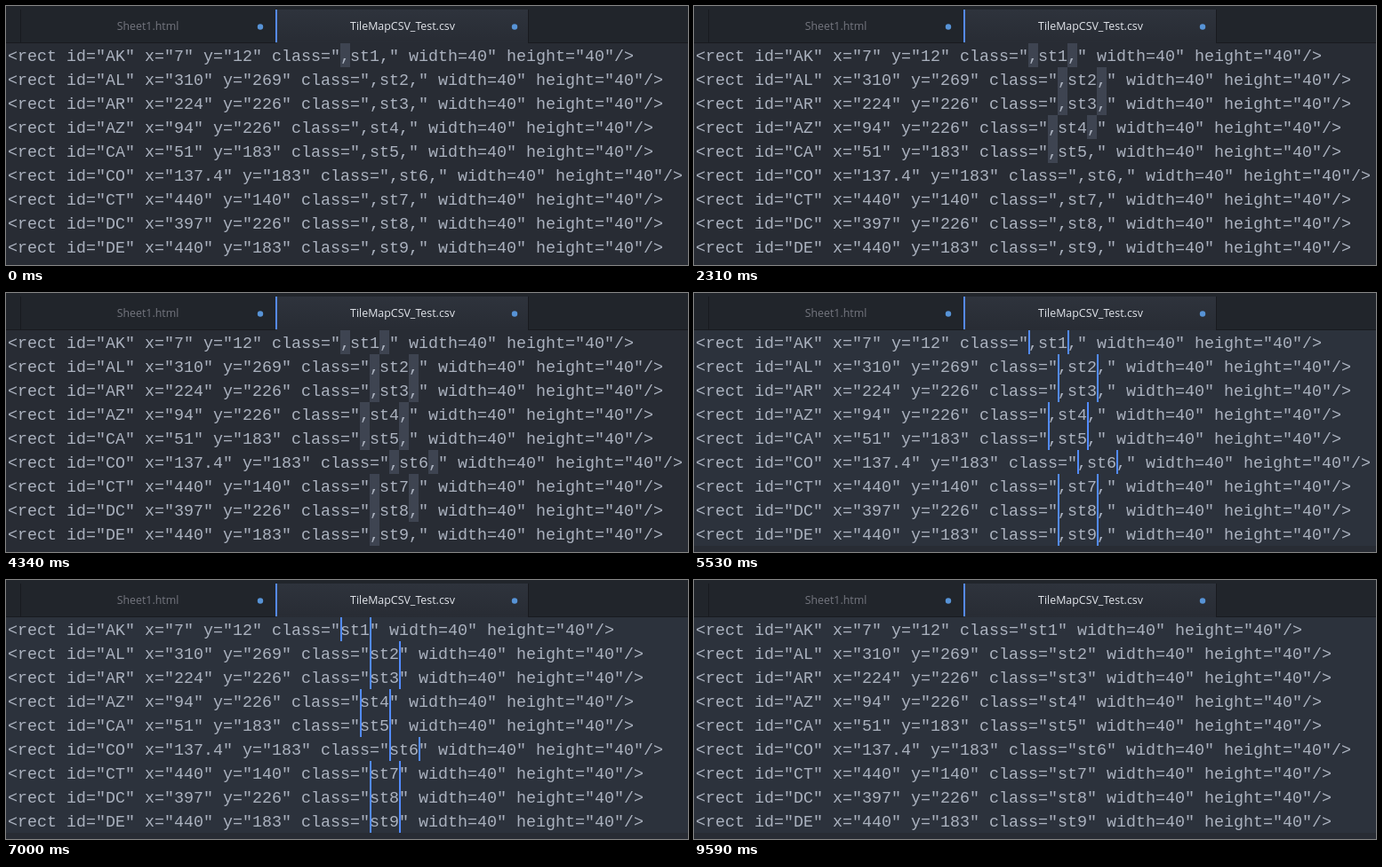
These frames come from a looping animation (767 by 292 pixels, 9730 ms). An HTML page with a canvas:

```html
<!DOCTYPE html>
<html lang="en">
<head>
<meta charset="utf-8">
<title>Multiple cursors</title>
<style>
  html, body { margin: 0; height: 100%; overflow: hidden; background: #282c34; }
  canvas { display: block; }
</style>
</head>
<body>
<canvas id="stage" width="767" height="292"></canvas>
<script>
const ctx = document.getElementById('stage').getContext('2d', { alpha: false });

const LOOP = 9730, CELL = 11, LEFT = 2, TOP = 42, ROW = 27;
const MOVE_LEFT = 5530, DELETE = 7000;
// Moments at which one more comma joins the selection
const SELECT = [0, 630, 840, 1050, 1330, 1540, 1820, 2030, 2310, 2520,
                2800, 3010, 3290, 3500, 3780, 4060, 4340, 4690];
// Moments at which the cursors switch on, off, on, ...
const BLINK = [5530, 5950, 6300, 6650, 7000, 7420, 7770, 8120, 8540, 8890, 9240, 9590];

const heads = [
  ['AK', 7, 12], ['AL', 310, 269], ['AR', 224, 226], ['AZ', 94, 226], ['CA', 51, 183],
  ['CO', 137.4, 183], ['CT', 440, 140], ['DC', 397, 226], ['DE', 440, 183]
].map(([id, x, y]) => `<rect id="${id}" x="${x}" y="${y}" class="`);

// Pick the font size that makes one character exactly one cell wide
const codeFont = size => `${size}px "Liberation Mono", "Noto Sans Mono", monospace`;
ctx.font = codeFont(100);
const CODE = codeFont(100 * CELL / ctx.measureText('0').width);
const LABEL = '12.4px "Open Sans", "Noto Sans", sans-serif';

const tabShade = ctx.createLinearGradient(0, 4, 0, 42);
tabShade.addColorStop(0, '#2e333c');
tabShade.addColorStop(1, '#282c34');

function box(color, x, y, w, h) {
  ctx.fillStyle = color;
  ctx.fillRect(x, y, w, h);
}

function text(string, x, y, color, font, align = 'left') {
  ctx.font = font;
  ctx.fillStyle = color;
  ctx.textAlign = align;
  ctx.fillText(string, x, y);
}

function dot(x, y) {
  ctx.fillStyle = '#5793d6';
  ctx.beginPath();
  ctx.arc(x, y, 3.2, 0, 7);
  ctx.fill();
}

function drawTabs() {
  box('#21252b', 0, 0, 767, 42);
  box('#181a1f', 0, 41, 767, 1);
  box(tabShade, 303, 4, 284, 38);
  for (const x of [16, 587]) box('#181a1f', x, 4, 1, 38);
  box('#568af2', 303, 4, 2, 37);
  text('Sheet1.html', 159.5, 27, '#74767f', LABEL, 'center');
  text('TileMapCSV_Test.csv', 446, 27, '#e2e5eb', LABEL, 'center');
  dot(286, 23.5);
  dot(572, 23.5);
}

function drawCode(t) {
  const passed = times => times.filter(time => time <= t).length;
  const selected = t < MOVE_LEFT ? passed(SELECT) : 0;
  const cursors = passed(BLINK) % 2;
  const comma = t < DELETE ? ',' : '';

  heads.forEach((head, i) => {
    const y = TOP + i * ROW;
    const start = LEFT + head.length * CELL;
    const stops = [start, start + (3 + comma.length) * CELL];
    if (t >= MOVE_LEFT) box('#2c323c', 0, y, 767, ROW);
    stops.forEach((x, side) => {
      if (i * 2 + side < selected) box('#3e4451', x, y, CELL, ROW);
    });
    text(`${head}${comma}st${i + 1}${comma}" width=40" height="40"/>`, LEFT, y + 20, '#abb2bf', CODE);
    if (cursors) stops.forEach(x => box('#528bff', x, y, 2, ROW));
  });
}

function frame() {
  box('#282c34', 0, 0, 767, 292);
  drawTabs();
  drawCode(performance.now() % LOOP);
  requestAnimationFrame(frame);
}
frame();
</script>
</body>
</html>
```
